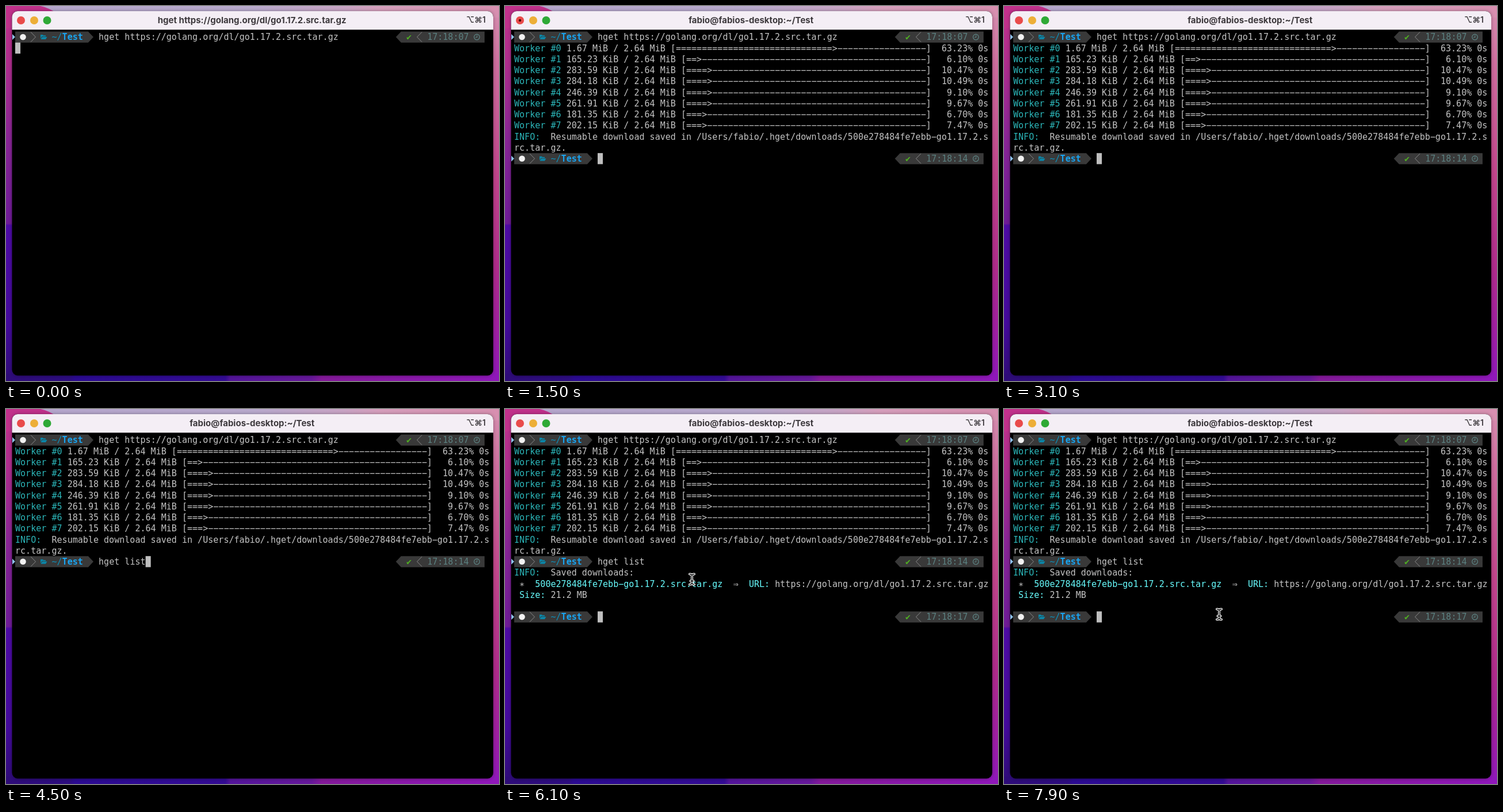
An HTML page with a canvas for the animation above (8000 ms loop, 857 px wide and 653 px high).

```html
<!DOCTYPE html>
<html lang="en">
<head>
<meta charset="utf-8">
<title>hget</title>
<style>
  html, body { margin: 0; width: 100%; height: 100%; overflow: hidden; background: #000; }
  canvas { display: block; width: 857px; height: 653px; }
</style>
</head>
<body>
<canvas id="stage" width="857" height="653"></canvas>
<script>
const ctx = document.getElementById('stage').getContext('2d');
const W = 857, H = 653, LOOP = 8000;
const CW = 9.065, RH = 19.25, LEFT = 16, TOP = 44.4, COLS = 91;
const MONO = '15.06px "DejaVu Sans Mono", monospace';
const UI = '"Inter", sans-serif';
const FG = '#c4c4c4', CYAN = '#2bb5b8', BRIGHT = '#67fbfd', SEG = '#393939';

const URL_TEXT = 'https://golang.org/dl/go1.17.2.src.tar.gz';
const FILE = '500e278484fe7ebb-go1.17.2.src.tar.gz';
const SHELL_TITLE = 'fabio@fabios-desktop:~/Test';
const LIST_CMD = 'hget list';

// Progress in KiB
const PART = 2707.9;
const SAVED = [1712.2, 165.23, 283.59, 284.18, 246.39, 261.91, 181.35, 202.15];

// Moments in ms
const T = { dotOn: 400, bars: 1000, tick: 200, saved: 1500, dotOff: 1800,
            type: 3350, key: 125, enter: 4700, listed: 4800, mouse: 5600,
            moveFrom: 6100, moveTo: 7600 };

const colX = c => LEFT + c * CW;
const rowY = r => TOP + r * RH;

function text(s, col, row, color = FG, bold = false) {
  ctx.font = (bold ? 'bold ' : '') + MONO;
  ctx.textAlign = 'left';
  ctx.textBaseline = 'alphabetic';
  ctx.fillStyle = color;
  // wide hyphens, as terminal fonts draw them
  ctx.fillText(s.replace(/-/g, '\u2212'), colX(col), rowY(row) + 15);
}

function poly(points, color) {
  ctx.beginPath();
  points.forEach(([x, y]) => ctx.lineTo(x, y));
  ctx.fillStyle = color;
  ctx.fill();
}

function line(points, color, width) {
  ctx.beginPath();
  points.forEach(([x, y]) => ctx.lineTo(x, y));
  ctx.strokeStyle = color;
  ctx.lineWidth = width;
  ctx.stroke();
}

function disc(x, y, r, color) {
  ctx.beginPath();
  ctx.arc(x, y, r, 0, Math.PI * 2);
  ctx.fillStyle = color;
  ctx.fill();
}

function gradient(x0, y0, x1, y1, stops) {
  const g = ctx.createLinearGradient(x0, y0, x1, y1);
  stops.forEach(([p, c]) => g.addColorStop(p, c));
  return g;
}

function wallpaper() {
  ctx.fillStyle = gradient(0, 0, W, 0, [[0, '#b5a6cd'], [0.5, '#b9aace'], [0.68, '#c9a5c6'], [0.76, '#d79fbd'], [1, '#d88fb0']]);
  ctx.fillRect(0, 0, W, 40);
  ctx.fillStyle = gradient(0, 0, 0, H, [[0, '#c2318c'], [0.15, '#b02d8e'], [0.35, '#8a2596'], [0.58, '#6f1b98'], [0.585, '#4e0ba6'], [0.85, '#440a9c'], [1, '#2e0b78']]);
  ctx.fillRect(0, 20, 430, H - 20);
  ctx.fillStyle = gradient(0, 0, 0, H, [[0, '#d790b1'], [0.15, '#cf6f9f'], [0.45, '#c2458c'], [0.7, '#b02b8c'], [0.86, '#a01fa2'], [1, '#9017bb']]);
  ctx.fillRect(430, 20, W - 430, H - 20);
  ctx.fillStyle = gradient(0, 0, W, 0, [[0, '#2e0b78'], [0.13, '#2c0c80'], [0.14, '#2b0a92'], [0.445, '#330b94'], [0.455, '#53149a'], [0.62, '#66189a'], [0.64, '#84199a'], [1, '#9017bb']]);
  ctx.fillRect(0, 640, W, 13);
  ctx.beginPath();
  ctx.moveTo(0, 0);
  ctx.lineTo(60, 0);
  ctx.quadraticCurveTo(75, 3, 90, 14);
  ctx.lineTo(0, 40);
  ctx.fillStyle = '#c2318c';
  ctx.fill();
}

function windowFrame(title, busy) {
  ctx.save();
  ctx.shadowColor = 'rgba(0,0,0,0.35)';
  ctx.shadowBlur = 6;
  ctx.fillStyle = '#000';
  ctx.beginPath();
  ctx.roundRect(10.5, 9, 836.5, 634.5, 10);
  ctx.fill();
  ctx.restore();

  ctx.fillStyle = '#f4eef5';
  ctx.beginPath();
  ctx.roundRect(10.5, 9, 836.5, 32.3, [10, 10, 0, 0]);
  ctx.fill();

  disc(26, 25, 7, '#e94b4b');
  disc(49, 25, 7, '#edae38');
  disc(71.5, 25, 7, '#2fa936');
  if (busy) disc(26, 25, 2.2, '#4d0808');

  ctx.fillStyle = '#3d393d';
  ctx.textBaseline = 'alphabetic';
  ctx.font = 'bold 15px ' + UI;
  ctx.textAlign = 'center';
  ctx.fillText(title, 427.7, 29.5);
  ctx.font = '600 14px ' + UI;
  ctx.textAlign = 'right';
  ctx.fillText('⌥⌘1', 834, 28.5);
}

function folder(x, y, color) {
  poly([[x, y + 3], [x, y - 4], [x + 4, y - 4], [x + 5, y - 2.8], [x + 9, y - 2.8], [x + 9, y - 1], [x + 2.5, y - 1]], color);
  poly([[x + 3, y - 0.2], [x + 11.5, y - 0.2], [x + 9, y + 4], [x + 0.5, y + 4]], color);
}

function prompt(row, time, command) {
  const y = rowY(row), mid = y + RH / 2, end = y + RH;
  poly([[11, mid - 5], [16, mid], [11, mid + 5]], '#8fc3ee');

  poly([[LEFT, y], [colX(14), y], [colX(15), mid], [colX(14), end], [LEFT, end]], SEG);
  disc(29.5, mid, 5.3, '#f2f2f2');
  line([[43, y + 1], [51.5, mid], [43, end - 1]], '#8a8a8a', 1);
  folder(60, mid, '#0b86a8');
  text('~/', 7, row, '#0f8fb8');
  text('Test', 9, row, '#18a5f2', true);
  text(command, 16, row);

  poly([[colX(73), mid], [colX(74), y], [colX(90), y], [colX(90), end], [colX(74), end]], SEG);
  text('✔', 75, row, '#4fae22');
  line([[723, y + 1], [714.5, mid], [723, end - 1]], '#8a8a8a', 1);
  text(time, 79, row, '#5b8080');
  ctx.beginPath();
  ctx.arc(818.5, mid, 4.8, 0, Math.PI * 2);
  ctx.strokeStyle = '#5b8080';
  ctx.lineWidth = 1.3;
  ctx.stroke();
  line([[818.8, mid - 3], [818.8, mid + 0.5], [816, mid + 0.5]], '#5b8080', 1.1);
}

function block(col, row) {
  ctx.fillStyle = '#bfbfbf';
  ctx.fillRect(colX(col), rowY(row), CW, RH);
}

function keyCursor(row) {
  const x = 20.5, y = rowY(row);
  ctx.beginPath();
  ctx.arc(x, y + 5.2, 3.2, 0, Math.PI * 2);
  ctx.strokeStyle = '#f4f4f4';
  ctx.lineWidth = 2;
  ctx.stroke();
  line([[x, y + 8], [x, y + 18]], '#f4f4f4', 2);
  line([[x, y + 13], [x + 4, y + 13]], '#f4f4f4', 1.8);
  line([[x, y + 16.6], [x + 4, y + 16.6]], '#f4f4f4', 1.8);
}

function size(kib) {
  if (kib === 0) return '0 B';
  return kib < 1024 ? kib.toFixed(2) + ' KiB' : (kib / 1024).toFixed(2) + ' MiB';
}

function worker(i, kib) {
  const pct = kib / PART * 100;
  const head = `${size(kib)} / ${size(PART)} [`;
  const tail = '] ' + pct.toFixed(2).padStart(6) + '%' + (kib ? ' 0s' : '');
  const width = COLS - 10 - head.length - tail.length;
  const full = Math.ceil(width * pct / 100);
  const bar = full ? '='.repeat(full - 1) + '>' : '';
  text('Worker #' + i, 0, i + 1, CYAN);
  text(head + bar.padEnd(width, '-') + tail, 10, i + 1);
}

function savedInfo() {
  const msg = 'INFO:  Resumable download saved in /Users/fabio/.hget/downloads/' + FILE + '.';
  text('INFO:', 0, 9, CYAN);
  text(msg.slice(7, COLS), 7, 9);
  text(msg.slice(COLS), 0, 10);
}

function listing() {
  text('INFO:', 0, 12, CYAN);
  text('Saved downloads:', 7, 12);
  text('∗', 1, 13);
  text(FILE, 4, 13, BRIGHT);
  text('⇒', 42, 13);
  text('URL:', 45, 13, BRIGHT);
  text(URL_TEXT, 50, 13);
  text('Size:', 1, 14, BRIGHT);
  text('21.2 MB', 7, 14);
}

function pointer(x, y) {
  ctx.save();
  ctx.translate(x, y);
  ctx.lineCap = 'round';
  const beam = new Path2D('M-4-9Q0-9 0-6Q0-9 4-9M0-6V6M-4 9Q0 9 0 6Q0 9 4 9M-2.5 3H2.5');
  ctx.strokeStyle = '#fff';
  ctx.lineWidth = 4;
  ctx.stroke(beam);
  ctx.strokeStyle = '#000';
  ctx.lineWidth = 1.4;
  ctx.stroke(beam);
  ctx.restore();
}

const clamp = v => Math.max(0, Math.min(1, v));
const smooth = v => v * v * (3 - 2 * v);

function draw(t) {
  const running = t < T.saved;
  const listRunning = t >= T.enter && t < T.listed;
  wallpaper();
  windowFrame(running ? 'hget ' + URL_TEXT : listRunning ? LIST_CMD : SHELL_TITLE,
              t >= T.dotOn && t < T.dotOff);
  prompt(0, '17:18:07', 'hget ' + URL_TEXT);

  if (t < T.bars) {
    block(0, 1);
  } else {
    const done = clamp(Math.floor((t - T.bars) / T.tick) / 2);
    SAVED.forEach((kib, i) => worker(i, kib * done));
    if (running) keyCursor(9);
  }

  if (!running) {
    const typed = Math.max(0, Math.min(LIST_CMD.length, Math.floor((t - T.type) / T.key) + 1));
    savedInfo();
    prompt(11, '17:18:14', LIST_CMD.slice(0, typed));
    if (t < T.enter) block(16 + typed, 11);
    if (listRunning) block(0, 12);
  }

  if (t >= T.listed) {
    listing();
    prompt(16, '17:18:17', '');
    block(16, 16);
  }

  if (t >= T.mouse) {
    const k = smooth(clamp((t - T.moveFrom) / (T.moveTo - T.moveFrom)));
    pointer(325 + 49 * k, 296.5 + 61 * k);
  }
}

const start = performance.now();
function tick() {
  draw((performance.now() - start) % LOOP);
  requestAnimationFrame(tick);
}
tick();
</script>
</body>
</html>
```
